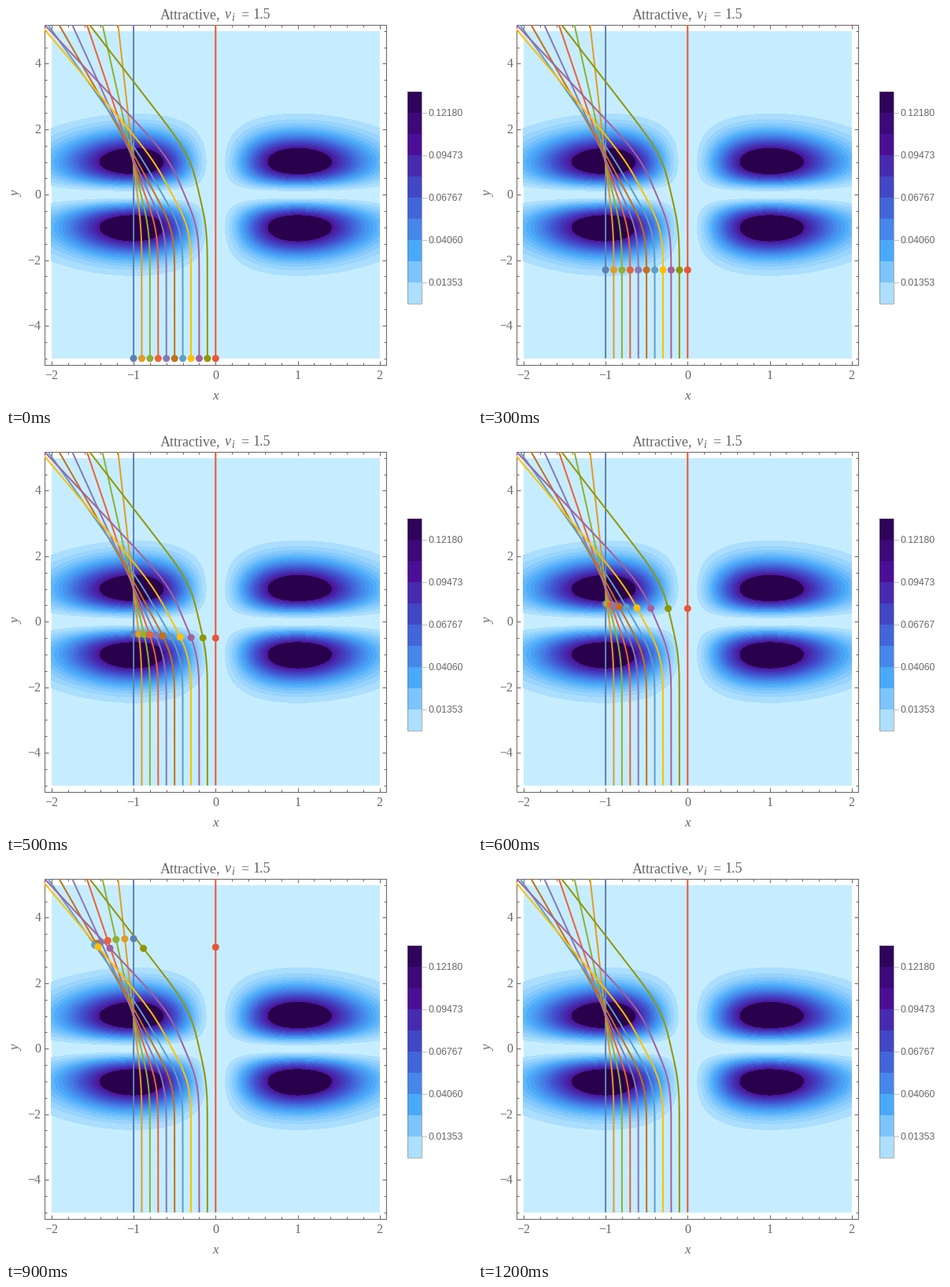
Animation, 592 px wide and 508 px high, one loop 5000 ms. Source, as a matplotlib script:

```python
import numpy as np
import matplotlib.pyplot as plt
from matplotlib.animation import FuncAnimation
from matplotlib.colors import LinearSegmentedColormap
from matplotlib.lines import Line2D
from matplotlib.patches import Rectangle
from matplotlib.ticker import MultipleLocator

W, H, DPI = 592, 508, 100
PT = 72 / DPI                         # points per pixel
GREY = "#666666"
LEFT, TOP, SIDE = 49.2, 23.6, 433.6   # plot frame in pixels
CX, CY = 266.3, 240.2                 # pixel position of the data origin
SX, SY = 104.25, 41.7                 # pixels per unit
STEP, SUB, STEPS = 0.6, 60, 12        # time per frame, substeps, moving frames
PEAK, LEVEL, BANDS = np.exp(-2), 0.005, 20

deep_sea = LinearSegmentedColormap.from_list(
    "deep_sea", ["#c6edff", "#4aa9f9", "#4055d1", "#4b0f96", "#29004b"], N=1024)
path_colors = ["#5e81b5", "#e19c24", "#8fb032", "#eb6235", "#8778b3", "#c56e1a",
               "#5d9ec7", "#ffbf00", "#a5609d", "#929600", "#e95536"]


def well(x, y):
    return x**2 * y**2 * np.exp(-x**2 - y**2)


def rate(s):
    """Derivative of (x, y, vx, vy) for mass 1/2 in the attractive wells."""
    x, y, vx, vy = s
    e = 4 * x * y * np.exp(-x**2 - y**2)
    return np.array([vx, vy, e * y * (1 - x**2), e * x * (1 - y**2)])


def integrate(starts, speed):
    h = STEP / SUB
    one = np.ones_like(starts)
    s = np.array([starts, -5 * one, 0 * one, speed * one])
    out = [s]
    for _ in range(STEPS * SUB):
        a = rate(s)
        b = rate(s + h / 2 * a)
        c = rate(s + h / 2 * b)
        d = rate(s + h * c)
        s = s + h / 6 * (a + 2 * b + 2 * c + d)
        out.append(s)
    return np.array(out)[:, :2]       # time, (x, y), particle


fig = plt.figure(figsize=(W / DPI, H / DPI), dpi=DPI, facecolor="white")


def label(x, y, text, size, font="Liberation Serif", **kw):
    kw = {"va": "baseline", "ha": "center", "color": GREY, **kw}
    fig.text(x / W, 1 - y / H, text, fontsize=size * PT, family=font, **kw)


def box(x, y, w, h, **kw):
    fig.add_artist(Rectangle((x / W, 1 - (y + h) / H), w / W, h / H, **kw))


# Plot area
ax = fig.add_axes([LEFT / W, 1 - (TOP + SIDE) / H, SIDE / W, SIDE / H])
ax.patch.set_visible(False)
ax.add_patch(Rectangle((-2, -5), 4, 10, color=deep_sea(0.0), lw=0, zorder=0))
gx, gy = np.meshgrid(np.linspace(-2, 2, 241), np.linspace(-5, 5, 401))
for i in range(1, BANDS + 1):
    # everything above the last level takes the darkest colour
    shade = 1.0 if i == BANDS else (i + 0.5) * LEVEL / PEAK
    ax.contourf(gx, gy, well(gx, gy), levels=[LEVEL * i, 1],
                colors=[deep_sea(shade)], zorder=0.5 + i / 100)

ax.set_xlim((LEFT - CX) / SX, (LEFT + SIDE - CX) / SX)
ax.set_ylim((CY - TOP - SIDE) / SY, (CY - TOP) / SY)
for axis, major, minor in ((ax.xaxis, 1, 0.2), (ax.yaxis, 2, 0.5)):
    axis.set_major_locator(MultipleLocator(major))
    axis.set_minor_locator(MultipleLocator(minor))
for which, length in (("major", 5), ("minor", 3)):
    ax.tick_params(which=which, direction="in", length=length * PT, width=PT,
                   color=GREY, top=True, right=True,
                   labelbottom=False, labelleft=False)
for spine in ax.spines.values():
    spine.set(color=GREY, linewidth=PT)

# Text
label(196, 16, "Attractive,", 18, ha="left")
label(277.5, 16, "v", 18, ha="left", style="italic")
label(286.5, 19, "i", 14, ha="left", style="italic")
label(303, 16, "=", 18)
label(325, 16, "1.5", 18)
for v in range(-2, 3):
    label(CX - 0.3 + SX * v, 475, str(v).replace("-", "\u2212"), 16)
for v in range(-4, 5, 2):
    label(44.5, CY - SY * v + 5, str(v).replace("-", "\u2212"), 16, ha="right")
label(266, 501.3, "x", 17, style="italic")
label(13, 238.8, "y", 17, style="italic", rotation=90, va="center")

# Colour bar
BAR_X, BAR_W, BAR_TOP, CELL = 510, 18, 109, 27
for i in range(10):
    box(BAR_X, BAR_TOP + (9 - i) * CELL, BAR_W, CELL,
        color=deep_sea(0.05 + 0.1 * i), lw=0)
box(BAR_X, BAR_TOP, BAR_W, 10 * CELL, fill=False, edgecolor=GREY,
    lw=PT, alpha=0.5)
for i in range(1, 10, 2):
    y = BAR_TOP + (10 - i) * CELL
    fig.add_artist(Line2D([(BAR_X + BAR_W) / W, 533.5 / W], [1 - y / H] * 2,
                          color="#b0b0b0", lw=0.8 * PT))
    label(536.7, y + 4.2, f"{0.1 * i * PEAK:.5f}", 12.2,
          "Liberation Sans", ha="left")

# Trajectories and particles
paths = integrate(np.linspace(-1, 0, 11), 1.5)
for i, color in enumerate(path_colors):
    ax.plot(paths[:, 0, i], paths[:, 1, i], color=color, lw=2 * PT,
            solid_capstyle="butt", snap=False, zorder=3)
dots = ax.scatter(paths[0, 0], paths[0, 1], s=(9 * PT) ** 2, c=path_colors,
                  linewidths=0, zorder=4)


def update(n):
    dots.set_offsets(paths[min(n, STEPS) * SUB].T)
    return dots,


anim = FuncAnimation(fig, update, frames=50, interval=100,
                     repeat=True, repeat_delay=0, blit=False)
plt.show()
```
